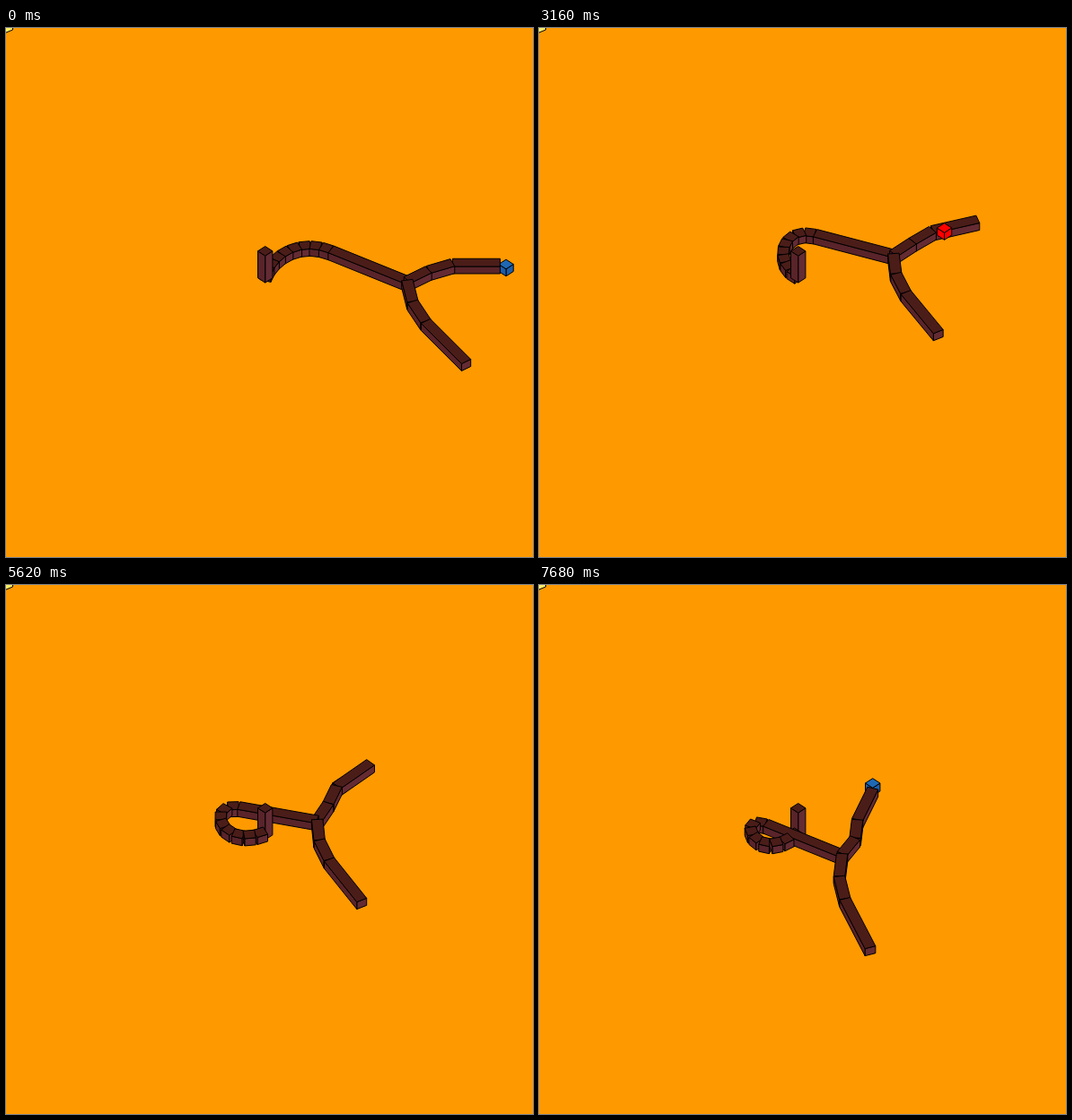
Recreate the animation shown at these times as an HTML page with a canvas. Size 587 by 590 pixels, loop 8000 ms.

```html
<!DOCTYPE html>
<html>
<head>
<meta charset="utf-8">
<style>
html, body { margin: 0; width: 100%; height: 100%; overflow: hidden; background: #f90; }
canvas { display: block; }
</style>
</head>
<body>
<canvas width="587" height="590"></canvas>
<script>
const ctx = document.querySelector('canvas').getContext('2d');
const curve = document.createElementNS('http://www.w3.org/2000/svg', 'path');
const TILT = 0.7, WIDTH = 12.5, HEIGHT = 8, LINKS = 8, LOOP = 8000;
const BASE = [289, 278 / TILT]; // on the ground plane, like every joint

const WOOD = ['#4b1d19', '#642b33', '#59242a']; // top, right side, left side
const RED = ['#f00', '#f00', '#f00'];
const BLUE = ['#1f68b4', '#1c5ca8', '#1c5ca8'];

// time, then joint headings in degrees: coil, link, lower finger, upper finger root and tip
const keys = [
  [1020, -28, 30, 63, -35, 0],
  [1490, -44, 25, 66, -34, -6],
  [2220, -54, 23, 67, -37, -10],
  [2490, -54, 23, 67, -37, -10],
  [3160, -74, 20.5, 68, -43, -18],
  [3870, -87, 23.5, 73, -43, -20],
  [4930, -97, 27, 71, -53, -27],
  [4970, -102, 21.5, 70, -58, -30],
  [5400, -120, 13, 69, -63, -41],
  [6340, -148, 18, 68, -70, -57],
  [7680, -161, 30, 78, -60, -71]
];

const mix = (a, b, f) => a.map((v, i) => v + (b[i] - v) * f);

function jointsAt(t) {
  const i = keys.findIndex(k => k[0] > t);
  if (i <= 0) return keys.at(i).slice(1);
  const a = keys[i - 1], b = keys[i];
  return mix(a, b, (t - a[0]) / (b[0] - a[0])).slice(1);
}

function go([x, y], heading, length) {
  const a = heading * Math.PI / 180;
  return [x + length * Math.cos(a), y + length * Math.sin(a)];
}

function chain(start, headings, lengths) {
  const points = [start];
  headings.forEach((h, i) => points.push(go(points[i], h, lengths[i])));
  return points;
}

// The further the coil swings round, the tighter it curls.
function coil(swing, heading, link) {
  const open = Math.max(0, (swing + 161) / 133) ** 1.5;
  const end = go(BASE, swing, 92 + swing / 3);
  const c1 = go(BASE, 154 * open - 230, 30 + 45 * (1 - open) ** 3);
  const c2 = go(end, heading, -.43 * link);
  curve.setAttribute('d', `M${BASE}C${c1} ${c2} ${end}`);
  const step = curve.getTotalLength() / LINKS;
  return Array.from({ length: LINKS + 1 }, (_, i) => {
    const p = curve.getPointAtLength(i * step);
    return [p.x, p.y];
  });
}

function poly(points, fill) {
  ctx.beginPath();
  points.forEach(p => ctx.lineTo(...p));
  ctx.closePath();
  ctx.fillStyle = fill;
  ctx.fill();
  ctx.stroke();
}

// top is a clockwise outline; only sides facing the viewer are drawn
function prism(top, h, colors) {
  top.forEach((p, i) => {
    const q = top[(i + 1) % top.length];
    if (q[0] < p[0])
      poly([p, q, [q[0], q[1] + h], [p[0], p[1] + h]], q[1] > p[1] ? colors[1] : colors[2]);
  });
  poly(top, colors[0]);
}

function segment(a, b) {
  const dx = b[0] - a[0], dy = b[1] - a[1];
  const k = WIDTH / 2 / Math.hypot(dx, dy);
  const corner = (p, side) => [p[0] - dy * k * side, (p[1] + dx * k * side) * TILT - HEIGHT / 2];
  prism([corner(a, -1), corner(b, -1), corner(b, 1), corner(a, 1)], HEIGHT, WOOD);
}

function box(x, y, h, colors, angle = 0) {
  const top = [0, 1, 2, 3].map(i => {
    const a = angle + (i - 1) * Math.PI / 2;
    return [x + 8.2 * Math.cos(a), y + 5.3 * Math.sin(a)];
  });
  prism(top, h, colors);
}

function arm([swing, heading, lower, root, tip]) {
  const link = 83 + heading / 2;
  const spine = coil(swing, heading, link);
  const fork = go(spine[LINKS], heading, link);
  const near = 1 + (fork[1] * TILT - 268) * .0028; // perspective
  const chains = [
    [...spine, fork],
    chain(fork, [lower + 17, lower + 2, lower - 8], [33 * near, 33 * near, 75 * near]),
    chain(fork, [root, (root + tip) * .65, tip], [29, 29, 53])
  ];
  const parts = [{ y: 279, draw: () => box(288.7, 248.8, 30, WOOD) }];
  for (const c of chains)
    for (let i = 1; i < c.length; i++)
      parts.push({ y: (c[i - 1][1] + c[i][1]) / 2 * TILT, draw: () => segment(c[i - 1], c[i]) });
  parts.sort((a, b) => a.y - b.y).forEach(part => part.draw());
}

function draw(t) {
  ctx.fillStyle = '#f90';
  ctx.fillRect(0, 0, 587, 590);
  ctx.strokeStyle = '#000';
  ctx.lineWidth = 1;
  ctx.lineJoin = 'round';
  poly([[-1, -1], [7.5, -1], [7.5, 2], [-1, 5.5]], '#fe6');

  // a goal cube turns blue once a fingertip reaches it
  if (t < 1020) box(557, 263.5, 8, BLUE);
  if (t >= 4110) box(371.7, 221, 9, t < 7680 ? RED : BLUE);
  arm(jointsAt(t));
  if (t >= 1020 && t < 2490) box(469.5, 347.5, 9, t < 2220 ? RED : BLUE, .45);
  if (t >= 2490 && t < 4110) box(451.5, 223, 8, RED);
}

function frame(now) {
  draw(now % LOOP);
  requestAnimationFrame(frame);
}
requestAnimationFrame(frame);
</script>
</body>
</html>
```
